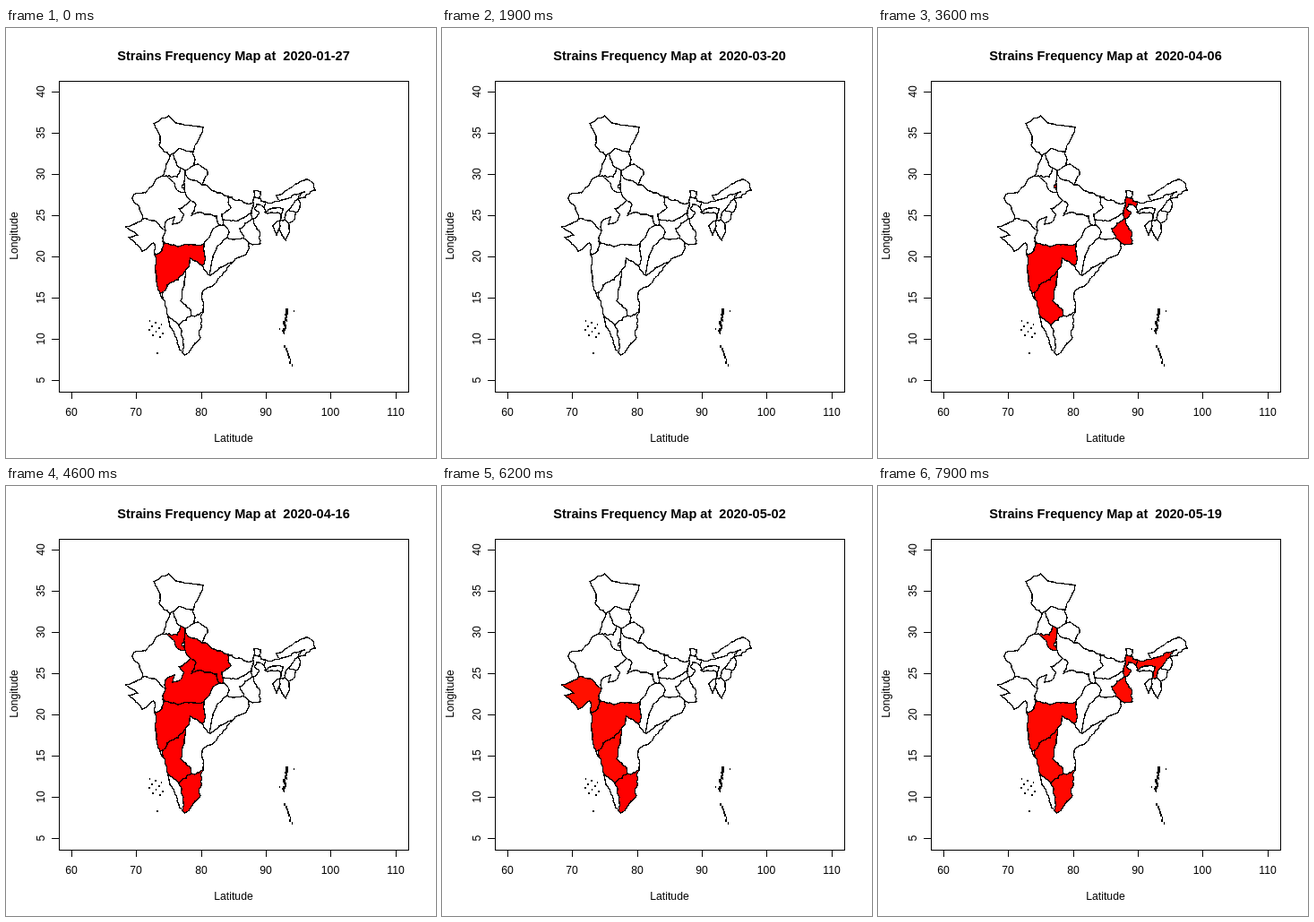
Recreate the animation shown at these times as an HTML page. Size 480 by 480 pixels, loop 8 s.

```html
<!DOCTYPE html>
<html lang="en">
<head>
<meta charset="utf-8">
<title>Strains Frequency Map</title>
<style>
html, body { margin: 0; width: 100%; height: 100%; overflow: hidden; background: #fff; }
svg { display: block; width: 480px; height: 480px; }
text { font: 12.2px Arial, "Liberation Sans", sans-serif; text-anchor: middle; }
#title { font-size: 14.55px; font-weight: bold; }
path { fill: none; shape-rendering: crispEdges; }
.line { stroke: #000; }
</style>
</head>
<body>
<svg viewBox="0 0 480 480">
  <g id="fills"></g>
  <path id="borders" class="line" stroke-width="1.35"/>
  <path id="islands" class="line" stroke-width="1.5"/>
  <path id="axes" class="line"/>
  <g id="labels"></g>
  <text id="title" x="254" y="36"></text>
</svg>
<script>
const $ = id => document.getElementById(id);

// Junctions where borders meet, each named by one character
const junctions = {};
const toPoint = s => s.split(',').map(Number);
for (const s of (
  'A183,142 B187,140 C209,138 D210,153 E218,175 F200,159 G248,188 H276,195 I277,189 J283,190 ' +
  'K290,194 L306,193 M326,191 N324,206 O315,203 P238,220 Q315,218 R312,214 S306,221 T306,215 ' +
  'U307,208 V289,206 W242,214 X288,200 Y284,241 Z271,240 a253,262 b220,317 c199,365 d181,322 ' +
  'e193,332 f175,303 g172,296 h176,294 i166,254 j133,222 k153,213 l175,165 m195,156 n179,165 ' +
  'o200,183 p206,192 q178,226 r175,238 s221,241 t219,266 u200,271 v207,321 w274,207 x228,276 ' +
  'y247,234 z243,220 1199,174 2199,179 3266,235 4196,177').split(' ')) {
  junctions[s[0]] = toPoint(s.slice(1));
}

// Borders from junction to junction, through a few key points
const borders = `
  A 171,131 172,122 165,107 182,98 194,107 220,111 214,127 C; A B; B 194,134 C; C 211,147 D;
  D 215,152 225,161 E; D F; F 202,166 210,170 E; E 232,182 G; G 255,192 H; H I; I J;
  I 277,182 284,183 J; J 285,193 K; K L; L 321,186 334,183 M;
  L 302,187 322,175 335,169 342,172 345,181 334,189 M; M 328,199 N; M O; O N; N 322,214 Q;
  O 312,208 R; R Q; Q 316,224 312,237 S; R T; T S; T 298,221 302,231 S; T U;
  U 309,202 301,201 V; U V; V X; X K; X 280,197 277,202 283,206 276,213 283,227 Y; Y Z;
  Z 269,251 a; a 234,285 219,296 b; b 217,345 211,352 203,363 c; c 191,352 d; c 198,347 e;
  d f; f g; g 168,277 i; g h; h f; i 165,240 152,249 137,234 147,231 j; j 143,219 k;
  k 149,200 141,191 144,185 156,184 170,167 l; l 179,152 A; B 188,147 m; m F; m 191,166 n;
  l n; n 187,172 191,181 o; F 1; 1 4; 4 2; 1 2; 2 o; o p;
  p 193,202 199,208 195,216 186,219 188,211 180,214 q; k 166,215 q; q r; r 174,249 i;
  r 192,244 s; s 222,255 t; t 206,257 u; u 192,281 180,287 h; u 199,288 195,305 206,314 v;
  v 201,326 e; e d; v 211,322 b; t x; x 238,268 a; x 231,255 241,240 y; y 249,229 z;
  s 227,234 233,223 P; P z; p 212,198 206,210 218,206 235,210 P; z W; W 241,208 251,201 G;
  W 260,215 w; w 275,201 H; w 275,213 261,224 3; y 3; 3 Z`
  .split(';').map(s => s.trim().split(' '));

// State outlines as walks around the junctions
const states = {
  MH: 'righutsr', KA: 'uhfdevu', TN: 'vbcev', GJ: 'ijkqri', MP: 'pqrsPp',
  UP: 'FEGWzPpo21F', HR: 'mF142onm', WB: 'HIJKXYZ3wH', AS: 'KLMORTUVXK', DL: '1421'
};

// Step at which a set of states lights up; a colon gives the green part.
const schedule = [
  [0, 'MH'], [1, ''], [8, 'MH'], [9, ''], [14, 'MH'], [16, ''],
  [23, 'MH TN'], [28, 'GJ MH'], [32, 'MH KA TN'], [35, 'MH KA WB DL'],
  [40, 'GJ MH KA'], [45, 'MH KA TN MP UP HR'], [50, 'GJ MH KA TN'],
  [55, 'GJ:32 MH WB TN'], [62, 'GJ:16 MH:8 KA:8 TN'],
  [69, 'GJ:16 MH:8 KA:16 DL'], [75, 'HR:10 WB:10 AS:10 MH:8 KA:8 TN:8']
];

let seed = 7;
const random = () => (seed = seed * 16807 % 2147483647) / 2147483647;
const spread = size => (random() - 0.5) * size;

// Midpoint displacement: returns the rugged way from p to q, without p.
function rugged(p, q) {
  const dx = q[0] - p[0], dy = q[1] - p[1], length = Math.hypot(dx, dy);
  if (length < 3) return [q];
  const shift = spread(Math.min(3.2, length * 0.3)) / length;
  const mid = [(p[0] + q[0]) / 2 - dy * shift, (p[1] + q[1]) / 2 + dx * shift];
  return [...rugged(p, mid), ...rugged(mid, q)];
}

const lines = borders.map(stops => {
  const pts = stops.map(s => junctions[s] || toPoint(s));
  return pts.slice(1).reduce((line, q, i) => line.concat(rugged(pts[i], q)), [pts[0]]);
});

function lineBetween(from, to) {
  const joins = (a, b) => borders.findIndex(s => s[0] === a && s[s.length - 1] === b);
  const i = joins(from, to);
  return i < 0 ? [...lines[joins(to, from)]].reverse() : lines[i];
}

const trace = pts => 'M' + pts.map(p => p.map(c => c.toFixed(1))).join('L');
$('borders').setAttribute('d', lines.map(trace).join(''));

function add(parent, tag, attrs, text = '') {
  const el = document.createElementNS('http://www.w3.org/2000/svg', tag);
  for (const k in attrs) el.setAttribute(k, attrs[k]);
  el.textContent = text;
  return $(parent).appendChild(el);
}

const shapes = {};
for (const name in states) {
  const walk = [...states[name]];
  const pts = walk.slice(1).flatMap((to, i) => lineBetween(walk[i], to));
  shapes[name] = add('fills', 'path', { d: trace(pts) + 'Z' });
}

// Island chains: a solid one, a sparse one and a scatter in the west
let islands = 'M321,316h1M305,336h1M168,363h2';
const islet = (x, y, w, h) => islands += `M${x + spread(2)},${y}h${w}v${h}`;
for (let y = 314; y < 342; y += 2) islet(312 - (y - 314) / 9, y, 2, 2);
for (let y = 355; y < 378; y += 3) islet(311 + (y - 355) / 3, y, 1, 2);
for (let i = 0; i < 10; i++) islet(159 + i * 7 % 17, 327 + i * 2, 1, 1);
$('islands').setAttribute('d', islands);

// Plot frame, ticks and labels
let axes = 'M59.5,59.5H449.5V406.5H59.5Z';
const turned = (x, y, text) => add('labels', 'text', { transform: `translate(${x} ${y}) rotate(-90)` }, text);
for (let lon = 60; lon <= 110; lon += 10) {
  const x = Math.round(73 + (lon - 60) * 7.235);
  axes += `M${x + .5},406v8`;
  add('labels', 'text', { x, y: 433 }, lon);
}
for (let lat = 5; lat <= 40; lat += 5) {
  const y = Math.round(439 - lat * 9.2);
  axes += `M59,${y + .5}h-8`;
  turned(42.5, y, lat);
}
$('axes').setAttribute('d', axes);
add('labels', 'text', { x: 254, y: 462 }, 'Latitude');
turned(13, 232, 'Longitude');

function dateAt(step) {
  if (step < 2) return step ? '2020-01-31' : '2020-01-27';
  return new Date(Date.UTC(2020, 2, step + 1)).toISOString().slice(0, 10);
}

let shown = -1;
function draw() {
  const step = Math.floor(performance.now() % 8000 / 100);
  if (step !== shown) {
    shown = step;
    $('title').textContent = 'Strains Frequency Map at\u00a0 ' + dateAt(step);
    const lit = schedule.filter(s => s[0] <= step).pop()[1];
    for (const name in shapes) shapes[name].style.fill = 'none';
    for (const item of lit.split(' ').filter(Boolean)) {
      const [name, green = 0] = item.split(':');
      shapes[name].style.fill = `rgb(255,${green},0)`;
    }
  }
  requestAnimationFrame(draw);
}
draw();
</script>
</body>
</html>
```
